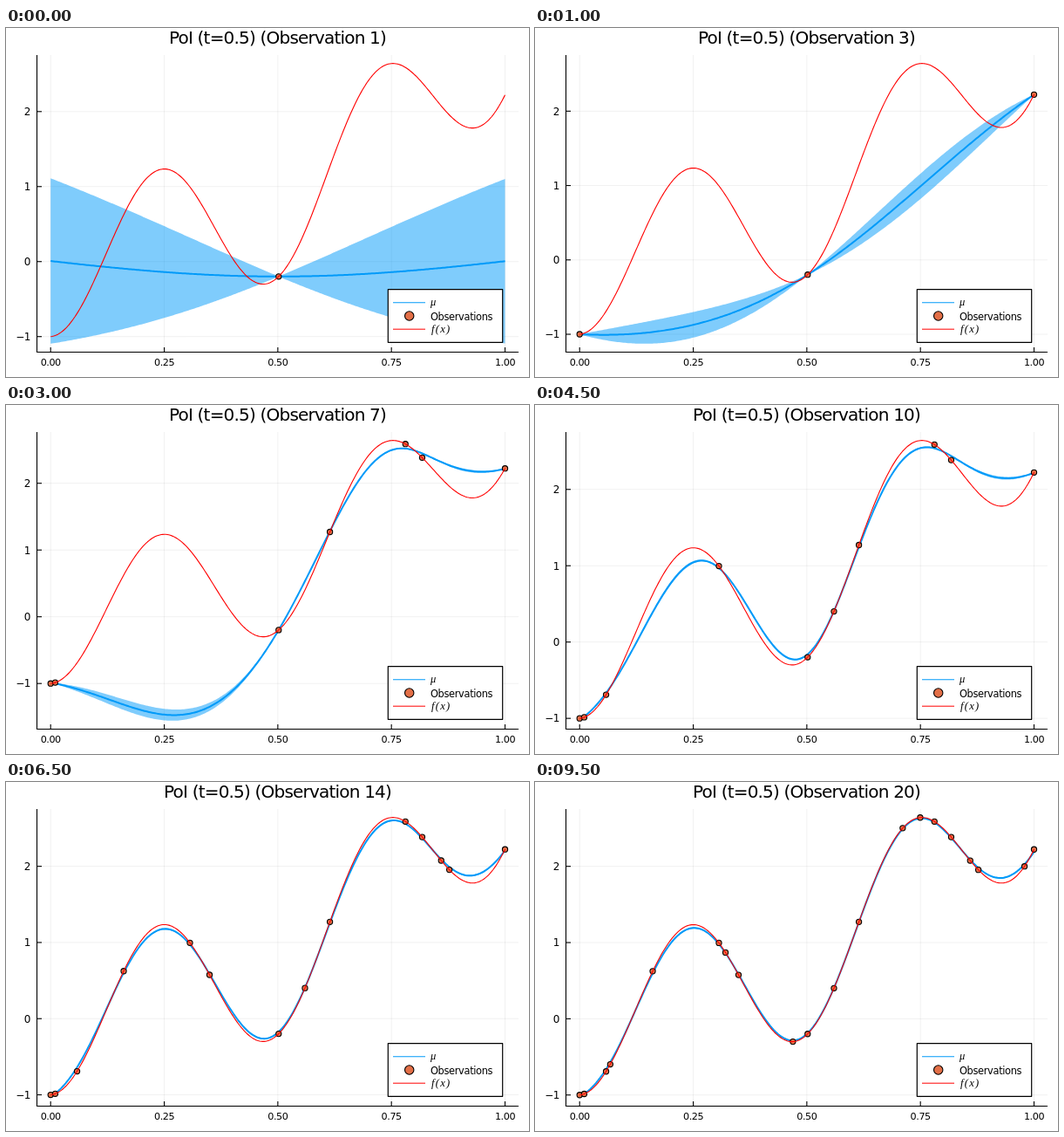
Recreate the animation shown at these times as an HTML page with a canvas. Size 600 px wide and 400 px high, loop 10000 ms.

```html
<!DOCTYPE html>
<html>
<head>
<meta charset="utf-8">
<style>
html, body { margin: 0; width: 100%; height: 100%; overflow: hidden; background: #fff; }
canvas { display: block; }
</style>
</head>
<body>
<canvas id="stage" width="600" height="400"></canvas>
<script>
const ctx = document.getElementById('stage').getContext('2d');
const BLUE = '#009af9', RED = '#ff0000', ORANGE = '#e36f47';
const SANS = '"DejaVu Sans", sans-serif', SERIF = '"Liberation Serif", serif';
const LEFT = 35.5, RIGHT = 588, TOP = 31, BOTTOM = 371.5;
const STEP = 500, SAMPLES = 300, MEAN = 1, VARIANCE = 3.86, NOISE = Math.exp(-10);

// sampled positions in the order they are observed
const obs = [0.5018, 0, 1, 0.7808, 0.8177, 0.6146, 0.0101, 0.3065, 0.5597, 0.0582,
  0.8595, 0.1608, 0.8775, 0.3497, 0.7495, 0.0674, 0.979, 0.711, 0.4693, 0.321];
const xs = Array.from({ length: SAMPLES + 1 }, (_, i) => i / SAMPLES);

const f = x => -Math.cos(13 * x) + 0.54 * x + 1.39 * x * x + 1.2 * x ** 3;

// Matern 5/2, unit length scale
function kernel(a, b) {
  const r = Math.sqrt(5) * Math.abs(a - b);
  return VARIANCE * (1 + r + r * r / 3) * Math.exp(-r);
}

const dot = (a, b) => a.reduce((sum, v, i) => sum + v * b[i], 0);

function invert(m) {
  const n = m.length;
  const a = m.map((row, i) => [...row, ...row.map((_, j) => +(i === j))]);
  for (let c = 0; c < n; c++) {
    const pivot = a[c][c];
    a[c] = a[c].map(v => v / pivot);
    for (let r = 0; r < n; r++) {
      if (r === c) continue;
      const k = a[r][c];
      a[r] = a[r].map((v, j) => v - k * a[c][j]);
    }
  }
  return a.map(row => row.slice(n));
}

// posterior mean and deviation after n observations
function fit(n) {
  const pts = obs.slice(0, n);
  const inv = invert(pts.map((a, i) => pts.map((b, j) => kernel(a, b) + (i === j ? NOISE : 0))));
  const resid = pts.map(x => f(x) - MEAN);
  const mu = [], sd = [];
  for (const x of xs) {
    const k = pts.map(p => kernel(x, p));
    const w = inv.map(row => dot(row, k));
    mu.push(MEAN + dot(w, resid));
    sd.push(Math.sqrt(Math.max(0, VARIANCE - dot(w, k)) + NOISE));
  }
  const upper = mu.map((m, i) => m + sd[i]), lower = mu.map((m, i) => m - sd[i]);
  const curve = xs.map(f);
  const min = Math.min(...lower, ...curve), max = Math.max(...upper, ...curve);
  const pad = 0.03 * (max - min);
  return { pts, mu, upper, lower, curve, min: min - pad, max: max + pad };
}

const px = x => 51.2 + 521.3 * x;

function line(points, color, width) {
  ctx.beginPath();
  points.forEach(p => ctx.lineTo(...p));
  ctx.strokeStyle = color;
  ctx.lineWidth = width;
  ctx.stroke();
}

function dotMark(x, y, r) {
  ctx.beginPath();
  ctx.arc(x, y, r, 0, 2 * Math.PI);
  ctx.fillStyle = ORANGE;
  ctx.fill();
  ctx.strokeStyle = '#000';
  ctx.lineWidth = 1.1;
  ctx.stroke();
}

function text(str, x, y, size, align, spacing = -0.04, font = SANS, style = '') {
  ctx.font = `${style} ${size}px ${font}`;
  ctx.letterSpacing = `${spacing * size}px`;
  ctx.textAlign = align;
  ctx.fillStyle = '#000';
  ctx.fillText(str, x, y);
}

function legend() {
  ctx.fillStyle = '#fff';
  ctx.fillRect(438.3, 299.7, 131.4, 60.6);
  ctx.strokeStyle = '#000';
  ctx.lineWidth = 1.2;
  ctx.strokeRect(438.3, 299.7, 131.4, 60.6);
  line([[444, 314.7], [481, 314.7]], BLUE, 1.1);
  line([[444, 345.2], [481, 345.2]], RED, 1);
  dotMark(462.7, 330, 5.2);
  text('μ', 487, 317.5, 12.5, 'left', 0, SERIF, 'italic');
  text('Observations', 487, 334.5, 11.4, 'left', -0.03);
  text('f(x)', 488, 349, 12.5, 'left', 0.1, SERIF, 'italic');
}

function draw(n) {
  const g = fit(n);
  const py = y => BOTTOM - (y - g.min) / (g.max - g.min) * (BOTTOM - TOP);
  const path = ys => ys.map((y, i) => [px(xs[i]), py(y)]);
  const xTicks = [0, 0.25, 0.5, 0.75, 1], yTicks = [];
  for (let y = Math.ceil(g.min); y <= g.max; y++) yTicks.push(y);

  ctx.fillStyle = '#fff';
  ctx.fillRect(0, 0, 600, 400);
  xTicks.forEach(x => line([[px(x), TOP], [px(x), BOTTOM]], 'rgba(0,0,0,.08)', 0.8));
  yTicks.forEach(y => line([[LEFT, py(y)], [RIGHT, py(y)]], 'rgba(0,0,0,.08)', 0.8));

  line([[LEFT, TOP], [LEFT, BOTTOM], [RIGHT, BOTTOM]], '#000', 1.1);
  for (const x of xTicks) {
    line([[px(x), BOTTOM], [px(x), BOTTOM - 5.5]], '#000', 1.1);
    text(x.toFixed(2), px(x), 387, 11.2, 'center');
  }
  for (const y of yTicks) {
    line([[LEFT, py(y)], [LEFT + 5.5, py(y)]], '#000', 1.1);
    text(String(y).replace('-', '−'), 28, py(y) + 4.3, 12, 'right');
  }
  text(`PoI (t=0.5) (Observation ${n})`, 311.5, 18, 20, 'center');

  ctx.beginPath();
  [...path(g.upper), ...path(g.lower).reverse()].forEach(p => ctx.lineTo(...p));
  ctx.fillStyle = 'rgba(0,154,249,.5)';
  ctx.fill();
  line(path(g.mu), BLUE, 2);
  g.pts.forEach(x => dotMark(px(x), py(f(x)), 3.1));
  line(path(g.curve), RED, 1.1);
  legend();
}

let shown = 0;
function tick(now) {
  const n = Math.floor(now / STEP) % obs.length + 1;
  if (n !== shown) draw(shown = n);
  requestAnimationFrame(tick);
}
ctx.lineJoin = 'round';
draw(shown = 1);
requestAnimationFrame(tick);
</script>
</body>
</html>
```
